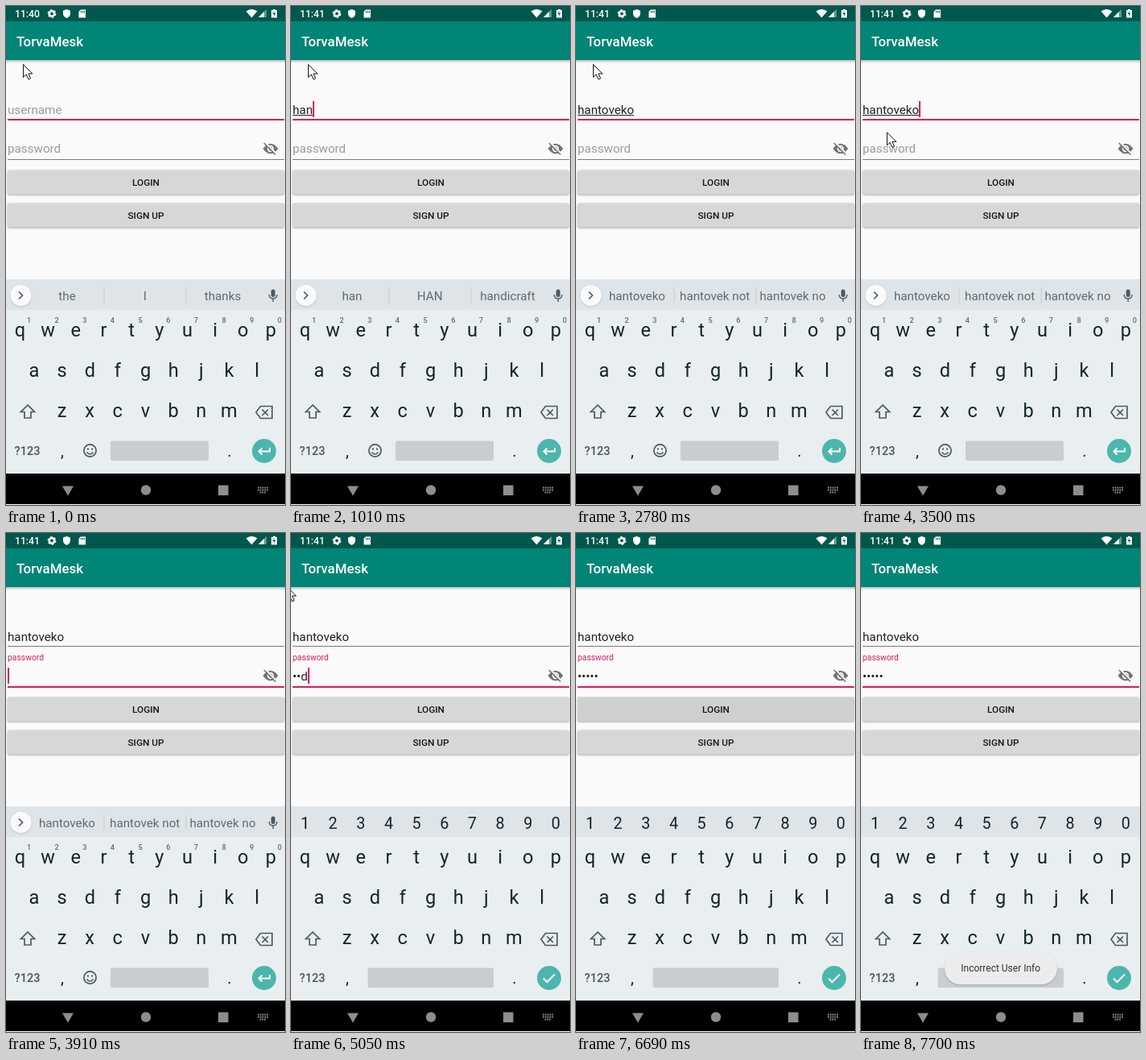
Animation, 347 px wide and 619 px high, one loop 8 s. Source, as an HTML page:

```html
<!DOCTYPE html>
<html lang="en">
<head>
<meta charset="utf-8">
<title>Login form</title>
<style>
html, body { margin: 0; width: 100%; height: 100%; overflow: hidden; background: #fafafa; }
svg { display: block; width: 347px; height: 619px; font: 15.2px Roboto, sans-serif; }
.mid { text-anchor: middle; }
.bold { font-weight: 500; }
.btn { fill: #d6d7d7; filter: drop-shadow(0 1px 1px #0005); }
.pressed { filter: drop-shadow(0 2px 2px #0008); }
.line { fill: none; stroke: #4c5b62; stroke-width: 1.7; }
#keys { fill: #12252d; }
</style>
</head>
<body>
<svg viewBox="0 0 347 619">
  <defs>
    <clipPath id="loginClip"><rect x="2" y="203.5" width="344" height="30" rx="2"/></clipPath>
    <linearGradient id="barShade" x2="0" y2="1">
      <stop stop-color="#000" stop-opacity=".25"/><stop offset="1" stop-opacity="0"/>
    </linearGradient>
  </defs>
  <rect width="347" height="619" fill="#fafafa"/>

  <!-- status and app bar -->
  <rect y="67" width="347" height="4" fill="url(#barShade)"/>
  <rect width="347" height="67" fill="#008577"/>
  <rect width="347" height="19" fill="#00574b"/>
  <g fill="#fff">
    <text id="clock" class="bold" x="11" y="14" font-size="12.2"></text>
    <circle cx="57" cy="9.5" r="3.2" fill="none" stroke="#fff" stroke-width="2.6"/>
    <circle cx="57" cy="9.5" r="4.7" fill="none" stroke="#fff" stroke-width="1.4" stroke-dasharray="2.46"/>
    <path d="M75.5 4l4.5 1.8v3.5q0 4-4.5 5.7q-4.500-1.700-4.500-5.700v-3.500z"/>
    <path d="M93 4.500h6v10h-8.500v-7.500z"/>
    <path d="M93.500 6v2.500m2-2.500v2.500m2-2.500v2.500" stroke="#00574b"/>
    <path d="M298.500 6.500q7-5 14 0l-7 8z"/>
    <path d="M324 4v10h-10z" opacity=".4"/><path d="M321 7v7h-7z"/>
    <path d="M332 4h3v1h2v9.500h-7v-9.500h2z"/>
    <path d="M334 6l-2.500 4h2l-.500 3l2.500-4h-2z" fill="#00574b"/>
    <text class="bold" x="13" y="50" font-size="16.9">TorvaMesk</text>
  </g>

  <!-- form -->
  <text id="userHint" x="2" y="134" fill="#9b9b9b">username</text>
  <text id="user" x="2" y="134" fill="#212121"></text>
  <rect id="compose" x="2" y="135" height="1" fill="#212121"/>
  <rect id="userLine" x="2" y="140" width="344"/>
  <text id="passHint" x="2">password</text>
  <text id="pass" x="2" y="182.500" fill="#212121"></text>
  <rect id="passLine" x="2" y="190" width="344"/>
  <rect id="caret" width="2" height="20" fill="#d81b60"/>
  <g fill="#737373">
    <path d="M319.500 177q9.500-12.600 19 0q-9.500 12.600-19 0z"/>
    <circle cx="329" cy="177" r="3.300" fill="none" stroke="#fafafa" stroke-width="1.700"/>
    <path d="M321.800 168.800l15 15" stroke="#fafafa" stroke-width="2"/>
    <path d="M320.800 170l14.500 14.500" stroke="#737373" stroke-width="1.600"/>
  </g>
  <rect id="login" class="btn" x="2" y="203.500" width="344" height="30" rx="2"/>
  <circle id="ripple" cx="287" cy="212" fill="#000" clip-path="url(#loginClip)"/>
  <rect class="btn" x="2" y="244.500" width="344" height="30" rx="2"/>
  <g class="mid bold" font-size="11.8" fill="#161616">
    <text x="174" y="222.700">LOGIN</text>
    <text x="174" y="263.700">SIGN UP</text>
  </g>

  <!-- keyboard -->
  <rect y="339" width="347" height="241" fill="#e9eef1"/>
  <rect y="339" width="347" height="38" fill="#dfe4e8"/>
  <rect id="space" y="539.500" height="24.500" rx="2" fill="#c9cdd0"/>
  <g id="keys" class="mid"></g>
  <g id="numbers" class="mid" fill="#12252d"></g>
  <g id="words" class="mid" fill="#5d6c74">
    <circle cx="18.500" cy="359" r="13" fill="#fafafa" style="filter:drop-shadow(0 1px 1px #0002)"/>
    <path class="line" d="M16 354.500l4.500 4.500l-4.500 4.500"/>
    <path d="M122 349v20M224 349v20" stroke="#c6ccd0"/>
    <text x="76" y="364.500"></text>
    <text x="172.700" y="364.500"></text>
    <text x="269.500" y="364.500"></text>
    <rect x="329.700" y="351.500" width="5" height="9.500" rx="2.500" fill="#4c5b62"/>
    <path class="line" style="stroke-width:1.400" d="M327.300 358q0 5 4.900 5q4.900 0 4.900-5M332.200 363v4"/>
    <g class="line">
      <circle cx="104.500" cy="551.500" r="7.600"/>
      <path d="M100.500 553.500q4 5 8 0"/>
      <path d="M101 549.500h2m3 0h2" stroke-width="2"/>
    </g>
  </g>
  <path class="line" d="M27 495l-8.500 8.500h4.500v7.500h8v-7.500h4.500z"/>
  <path class="line" d="M316.500 496.500h14.500v15h-14.500l-5.500-7.500zM318.500 500.500l7.500 7.500m0-7.500l-7.500 7.500"/>
  <text class="mid bold" x="26.500" y="557" font-size="14.500" fill="#46565d">?123</text>
  <circle cx="321" cy="552" r="15" fill="#4db6ac"/>
  <path id="enter" fill="none" stroke="#fff" stroke-width="2"/>

  <!-- navigation bar -->
  <rect y="580" width="347" height="38"/>
  <g fill="#8d8d8d">
    <path d="M70 595.500h14l-7 12z"/>
    <circle cx="174" cy="600.500" r="6.200"/>
    <rect x="264" y="594.500" width="12.500" height="12.500"/>
    <path d="M313 597.500h13M313 600.500h13M315.500 603.500h8" stroke="#8d8d8d" stroke-width="1.800" stroke-dasharray="1.800 1"/>
  </g>

  <g id="toast">
    <rect x="104" y="520" width="140" height="40" rx="20" fill="#ececec" style="filter:drop-shadow(0 1px 1px #0003)"/>
    <text class="mid" x="173.700" y="543.700" font-size="12" fill="#333">Incorrect User Info</text>
  </g>
  <path id="mouse" d="M0 0v16l3.700-3.500l2.800 6l2.600-1.200l-2.700-5.800h5z" fill="#fff" stroke="#111"/>
</svg>
<script>
const LOOP = 8000, FOCUS = 3730, NUMERIC = 4030, PINK = '#d81b60', GREY = '#7c7c7c';
const $ = id => document.getElementById(id);
const set = (el, attrs) => { for (const k in attrs) el.setAttribute(k, attrs[k]); };
const show = (el, on) => set(el, { visibility: on ? 'visible' : 'hidden' });
const put = (el, s) => { if (el.textContent !== s) el.textContent = s; };
const clamp = v => Math.min(1, Math.max(0, v));
// value of the last [time, value] entry already reached
const at = (list, t) => list.findLast(e => e[0] <= t)[1];
const hold = (t, start) => start + Math.floor((t - start) / 60) * 60;

function addText(parent, s, x, y, size, extra = {}) {
  const el = document.createElementNS('http://www.w3.org/2000/svg', 'text');
  set(el, { x, y, 'font-size': size, ...extra });
  el.textContent = s;
  parent.append(el);
}
[['qwertyuiop', 17.5, 410], ['asdfghjkl', 35, 460], ['zxcvbnm', 69.5, 510]].forEach(([row, x, y]) =>
  [...row].forEach((c, i) => addText($('keys'), c, x + i * 34.65, y, 23.6)));
addText($('keys'), ',', 70, 559, 20);
addText($('keys'), '.', 278, 559, 20);
[...'1234567890'].forEach((c, i) => {
  addText($('numbers'), c, 17.5 + i * 34.65, 366.5, 19.8);
  addText($('words'), c, 28.5 + i * 34.65, 393, 9.2, { class: 'bold' });
});
const slots = [...$('words').querySelectorAll('text')].slice(0, 3);

const typed = [[0, ''], [650, 'h'], [780, 'ha'], [950, 'han'], [1130, 'hanto'], [1240, 'hantov'],
  [1980, 'hantove'], [2280, 'hantoveko']];
const suggestions = [[0, 'the|I|thanks'], [710, 'h|have|he'], [840, 'ha|have|had'],
  [1010, 'han|HAN|handicraft'], [1240, 'hantov|hand to|handover'], [2100, 'hantove|hanto v|handover'],
  [2340, 'hantoveko|hantovek not|hantovek no']];
const secret = 'asdsd';
const secretCount = [[0, 0], [4820, 1], [4940, 2], [5050, 3], [5170, 4], [5230, 5]];
const blinks = [130, 1800, 1980, 2780, 3020, 4260, 4760, 5670, 6210, 6690, 7210, 7700];
const path = [[0, 21.5, 72.5], [3040, 21.5, 72.5], [3150, 23, 65.5], [3500, 34, 172], [3730, 34, 172],
  [3860, 8, 160], [3860, -40, 0], [3970, -40, 0], [3970, -5, 66.5], [5720, -5, 66.5], [5720, -40, 0],
  [6030, -40, 0], [6030, 338, 211], [6210, 287.5, 212.5], [6570, 287.5, 212.5], [6630, 305, 213],
  [6630, -40, 0], [LOOP, -40, 0]];

function mouseAt(t) {
  const i = path.findLastIndex(p => p[0] <= t);
  const [t0, x0, y0] = path[i], [t1, x1, y1] = path[i + 1];
  const p = (t - t0) / (t1 - t0);
  return [x0 + (x1 - x0) * p, y0 + (y1 - y0) * p];
}

function drawForm(t) {
  const focused = t >= FOCUS, name = at(typed, t);
  put($('user'), name);
  show($('userHint'), !name);
  const nameWidth = name ? $('user').getComputedTextLength() : 0;
  set($('compose'), { width: focused ? 0 : nameWidth });
  set($('userLine'), { height: focused ? 1 : 2, fill: focused ? GREY : PINK });
  set($('passLine'), { height: focused ? 2 : 1, fill: focused ? PINK : GREY });

  const p = 1 - (1 - clamp((hold(t, 3730) - 3680) / 260)) ** 2;
  const f = focused ? p : 0;
  set($('passHint'), { y: 182 - 24.5 * f, 'font-size': 15.2 - 4.9 * f,
    style: `fill:color-mix(in srgb, ${PINK} ${f * 100}%, #9b9b9b)` });

  const n = at(secretCount, t);
  put($('pass'), t < 6690 && n ? '•'.repeat(n - 1) + secret[n - 1] : '•'.repeat(n));
  const passWidth = n ? $('pass').getComputedTextLength() : 0;
  set($('caret'), { x: Math.round(2 + (focused ? passWidth : nameWidth)), y: focused ? 167 : 118 });
  show($('caret'), blinks.filter(b => b <= t).length % 2);
}

function drawLogin(t) {
  const q = hold(t, 6400) - 6400, down = q >= 0 && q < 290;
  $('login').classList.toggle('pressed', down && q < 240);
  set($('ripple'), { r: down ? q * 2.93 : 0, opacity: 0.1 * clamp((290 - q) / 150) });
}

function drawKeyboard(t) {
  const numeric = t >= NUMERIC;
  show($('words'), !numeric);
  show($('numbers'), numeric);
  at(suggestions, t).split('|').forEach((s, i) => put(slots[i], s));
  const x = numeric ? 95.5 : 130;
  set($('space'), { x, width: 252 - x });
  set($('enter'), { d: numeric ? 'M314 552.5l4.500 4.500l9.500-9.500' : 'M328 548v4.500h-13.500M318.500 548.500l-4 4l4 4' });
}

function draw(t) {
  put($('clock'), t < 340 ? '11:40' : '11:41');
  drawForm(t);
  drawLogin(t);
  drawKeyboard(t);
  set($('toast'), { opacity: clamp((hold(t, 7050) - 6990) / 420) });
  set($('mouse'), { transform: `translate(${mouseAt(Math.max(0, hold(t, 30)))})` });
}

const start = performance.now();
function frame() {
  draw((performance.now() - start) % LOOP);
  requestAnimationFrame(frame);
}
frame();
</script>
</body>
</html>
```
